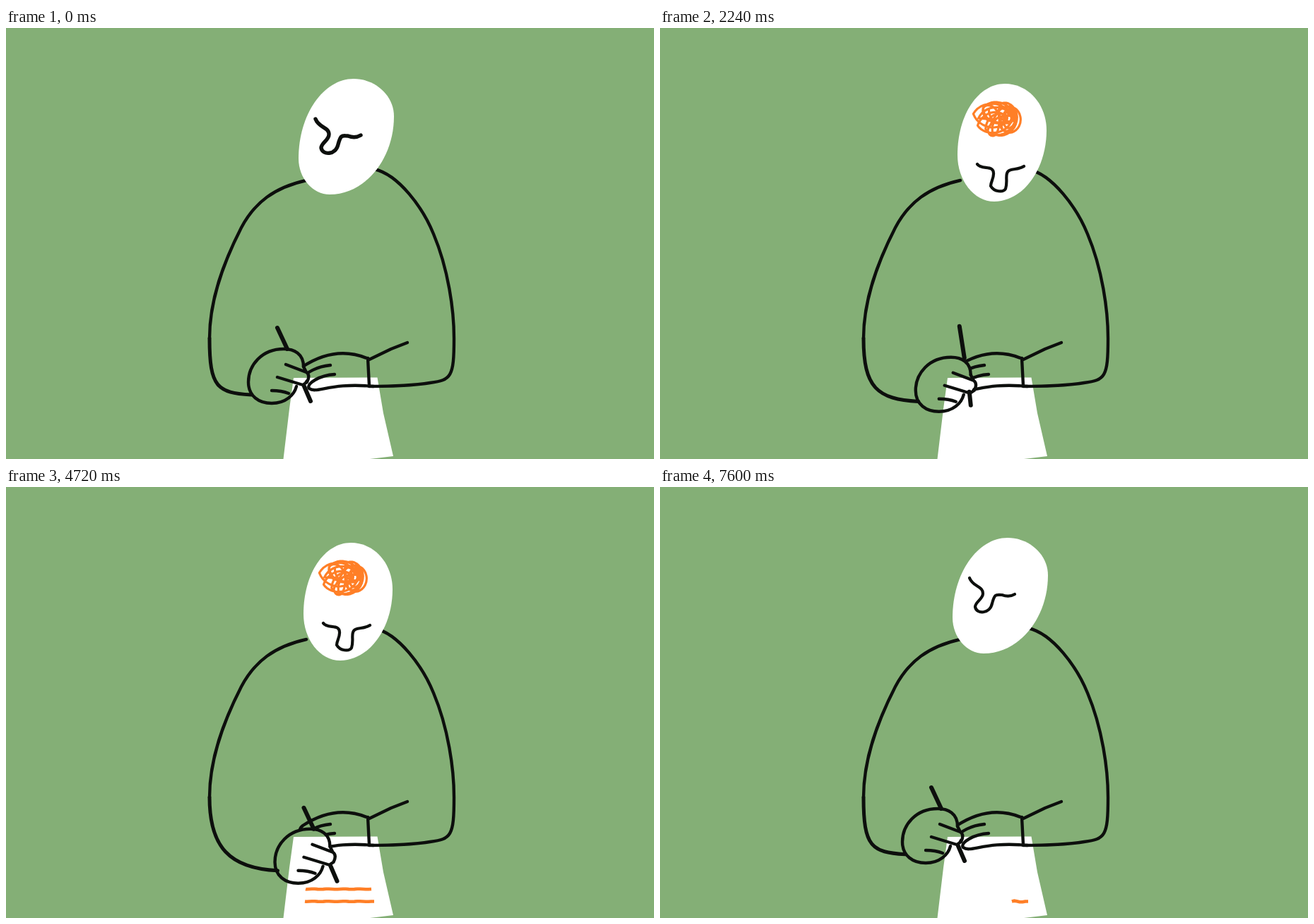
Write an HTML page that moves like this. It is 917 px wide and 611 px high and loops after 7.68 s.

```html
<!DOCTYPE html>
<html lang="en">
<head>
<meta charset="utf-8">
<title>Untangling thoughts</title>
<style>
  html, body { margin: 0; width: 100%; height: 100%; overflow: hidden; background: #84af76; }
  svg { display: block; width: 100vw; height: 100vh; }
  .ink, .orange { fill: none; stroke-linecap: round; stroke-linejoin: round; }
  .ink { stroke: #0d0f0d; stroke-width: 4.4; }
  .orange { stroke: #ff7f27; }
  .white { fill: #fff; }
</style>
</head>
<body>
<svg viewBox="0 0 917 611">
  <defs>
    <mask id="behindHand" maskUnits="userSpaceOnUse" x="0" y="0" width="917" height="611">
      <rect width="917" height="611" fill="#fff"/>
      <path id="handShape" d="M421 480C421 462 408 455 393 455C362 455 343 478 343 502C343 522 358 532 376 532C396 532 408 520 411 508L420 506L428 492Z"/>
    </mask>
  </defs>
  <rect width="917" height="611" fill="#84af76"/>
  <path class="white" d="M407 496L525.500 495.500L534 546L548 607L515 611H392.500L401 540Z"/>
  <path id="writing" class="orange" stroke-width="4.600" style="stroke-linecap:butt"/>

  <path class="ink" d="M425 216C380 226 352 247 333 283C308 332 288 385 288 440"/>
  <path id="forearm" class="ink" style="stroke-width:5"/>
  <g mask="url(#behindHand)" class="ink">
    <path d="M521 200C556 208 590 255 605 292C626 342 634 400 634 440C634 495 630 499 600 503C575 507 545 508 514 508"/>
    <path d="M513 469C483 456 452 459 420 480C414 485 415 491 418 496"/>
    <path d="M459 478C440 480 425 488 419 497L424 501M465 491C445 492 424 504 429 511C440 519 458 502 520 508"/>
    <path d="M568 446L545 455L514 470M512 468L514 507"/>
  </g>

  <g id="hand" class="ink">
    <path id="pen" style="stroke-width:6"/>
    <path d="M421 480C421 462 408 455 393 455C362 455 343 478 343 502C343 522 358 532 376 532C396 532 408 520 411 508"/>
    <path d="M396 477L425 488Q431 492 426 502L420 506L384 495M376 514Q390 514 400 518M421 480L425 488"/>
  </g>

  <g id="headUp">
    <path class="white" d="M492 72C523 72 549 96 549 125C549 186 508 236 458 236C434 236 414 213 414 185C414 123 449 72 492 72Z"/>
    <path class="ink face" d="M438 129C443 142 457 140 457 151C457 159 446 163 446 170C448 181 467 180 470 165C474 150 476 153 484 153C492 156 497 155 502 152"/>
  </g>
  <g id="headDown">
    <path class="white" d="M488 79C522 79 547 109 547 145C547 200 514 246 473 246C444 246 421 216 421 180C421 122 451 79 488 79Z"/>
    <path id="scribble" class="orange" pathLength="1"/>
    <path class="ink face" d="M449 193C455 202 473 193 472 207C472 214 468 218 468 224C473 233 486 233 489 228C492 218 489 212 491 206C493 198 506 202 515 196"/>
  </g>
</svg>
<script>
const LOOP = 7680, STEP = 80, BOIL = 200;
const HEAD_DOWN = 1800, HEAD_UP = 7600;
const ROWS = 4, FIRST_ROW = 2880, ROW_PERIOD = 960, ROW_TIME = 800;
const ERASE_START = 6960, ERASE_TIME = 170;

const part = id => document.getElementById(id);
const set = (id, name, value) => part(id).setAttribute(name, value);
const mix = (a, b, k) => a + (b - a) * k;
// Progress from 0 to 1 of a span of time
const progress = (t, start, duration) => Math.max(0, Math.min(1, (t - start) / duration));
const random = n => {
  const v = Math.sin(n * 12.9898) * 43758.5453;
  return v - Math.floor(v);
};

// A small knot, followed by loops that wander over the forehead
const knot = 'M462 129C452 116 458 106 470 111C484 118 481 140 476 150C470 158 460 148 466 140'
  + 'C472 131 478 112 492 111C512 110 518 140 498 148C480 152 472 122 492 124'
  + 'C508 126 500 138 478 134C472 132 464 132 462 129';
function tangle(seed) {
  const loops = 11, points = 24;
  const loopAt = i => {
    const angle = Math.PI + i * 2.4, reach = 0.6 + 0.4 * random(seed + i);
    return [485 + 29 * reach * Math.cos(angle), 128 + 19 * reach * Math.sin(angle),
      11 + 7 * random(seed + i + 50)];
  };
  let d = knot;
  for (let n = 0; n <= loops * points; n++) {
    const i = Math.floor(n / points), turn = n / points - i;
    const next = loopAt(i + 1);
    const [x, y, r] = loopAt(i).map((v, j) => mix(v, next[j], turn));
    const angle = Math.PI + turn * 2 * Math.PI;
    d += `L${(x + r * Math.cos(angle)).toFixed(1)} ${(y + r * Math.sin(angle)).toFixed(1)}`;
  }
  return d;
}
const tangles = [tangle(3), tangle(8)];

// Rows are written from right to left, the lowest one first
const rows = Array.from({ length: ROWS }, (_, i) => ({
  start: FIRST_ROW + i * ROW_PERIOD,
  eraseStart: ERASE_START + (ROWS - 1 - i) * ERASE_TIME,
  y: 587.5 - 17.5 * i,
  right: 521 - 4 * i,
  left: 423 + i * i
}));

function rowPath(row, t, wave) {
  const shown = progress(t, row.start, ROW_TIME) - progress(t, row.eraseStart, ERASE_TIME);
  if (shown <= 0) return '';
  const stop = mix(row.right, row.left, shown);
  let d = `M${row.right} ${row.y}`;
  for (let x = row.right - 4; x > stop; x -= 4) {
    d += `L${x} ${row.y + wave * Math.sin(x / 3.5)}`;
  }
  return d + `L${stop} ${row.y}`;
}

// Offset of the hand that puts the pen tip at a place in a row
const handOn = (row, k) => [mix(row.right, row.left, k) - 431, row.y - 531.5];
const between = (a, b, k) => a.map((v, j) => mix(v, b[j], k));

function handAt(t, upright) {
  if (t < FIRST_ROW) {
    const thinking = [-5 * upright, -3 * upright];
    return between(thinking, handOn(rows[0], 0), progress(t, 2080, 640));
  }
  const i = Math.min(ROWS - 1, Math.floor((t - FIRST_ROW) / ROW_PERIOD));
  const row = rows[i], end = row.start + ROW_TIME;
  if (t <= end) return handOn(row, progress(t, row.start, ROW_TIME));
  const next = i < ROWS - 1 ? handOn(rows[i + 1], 0) : [0, 1];
  return between(handOn(row, 1), next, progress(t, end, ROW_PERIOD - ROW_TIME));
}

function draw(t) {
  const boil = Math.floor(t / BOIL) % 4;
  const upright = progress(t, 0, 600) - progress(t, 2240, 400);
  const [x, y] = handAt(t, upright);

  const wristX = 347 + x, wristY = 520 + 0.8 * y;
  const bendX = mix(wristX, 260, 0.55);
  set('forearm', 'd', `M288 440C288 510 ${bendX} ${wristY - 3} ${wristX} ${wristY}`);
  for (const id of ['hand', 'handShape']) set(id, 'transform', `translate(${x} ${y})`);

  const lean = (x0, y0, x1, y1) => `${mix(x0, x1, upright)} ${mix(y0, y1, upright)}`;
  set('pen', 'd', `M${lean(384, 425, 405, 411)}L${lean(398, 455, 412, 456)}`
    + `M${lean(422, 508, 419, 504)}L${lean(431, 529, 421, 523)}`);

  const down = t >= HEAD_DOWN && t < HEAD_UP;
  part('headUp').style.display = down ? 'none' : '';
  part('headDown').style.display = down ? '' : 'none';
  for (const face of document.querySelectorAll('.face')) {
    face.style.strokeWidth = boil < 2 ? 5.4 : 4.2;
  }

  const thought = progress(t, HEAD_DOWN, 400) - progress(t, 5640, 1460);
  set('scribble', 'd', tangles[boil % 2]);
  set('scribble', 'stroke-dasharray', `${thought} 2`);
  set('scribble', 'stroke-width', mix(4.2, 3.2, thought));
  set('scribble', 'visibility', thought > 0 ? 'inherit' : 'hidden');

  const wave = boil === 2 ? 0.9 : 0.3;
  set('writing', 'd', rows.map(row => rowPath(row, t, wave)).join(''));
}

const began = performance.now();
function tick() {
  const t = (performance.now() - began) % LOOP;
  draw(Math.floor(t / STEP) * STEP);
  requestAnimationFrame(tick);
}
tick();
</script>
</body>
</html>
```
